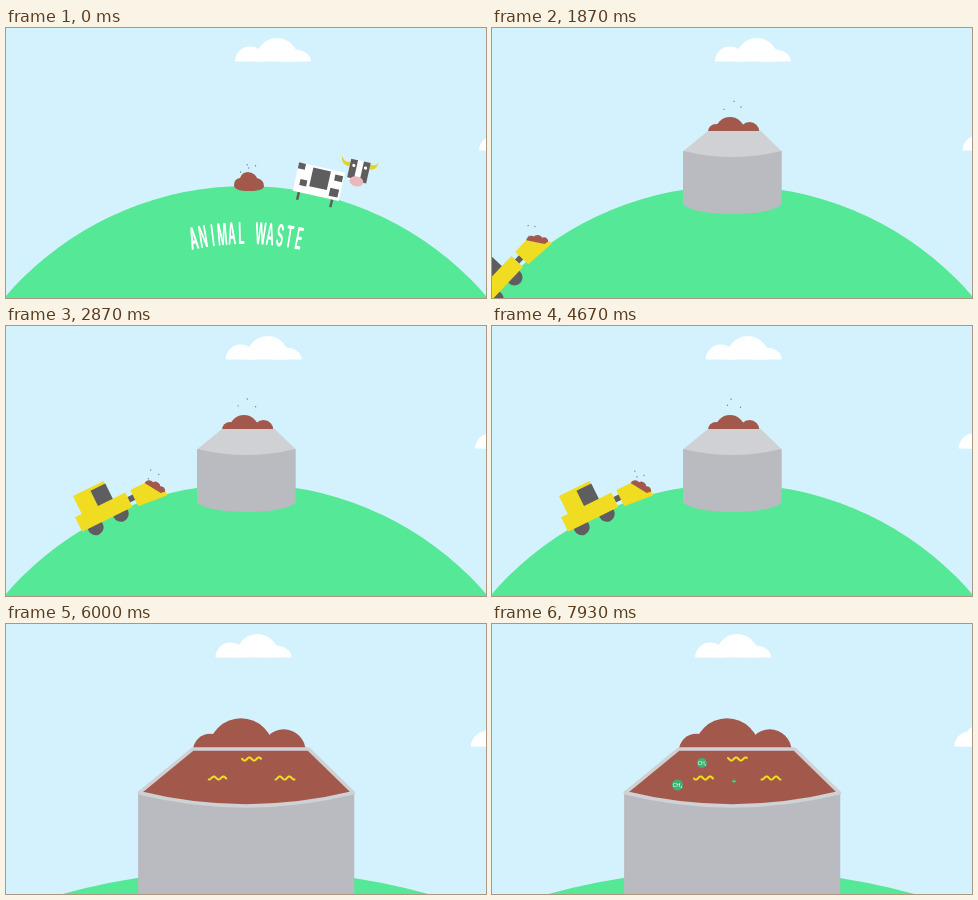
These frames come from a looping animation (480x270 px, 8000 ms). An HTML page with a canvas:

```html
<!DOCTYPE html>
<html lang="en">
<head>
<meta charset="utf-8">
<title>Animal waste</title>
<style>
  html, body { margin: 0; width: 100%; height: 100%; overflow: hidden; background: #d3f2fd; }
  canvas { display: block; width: 480px; height: 270px; }
</style>
</head>
<body>
<canvas id="stage" width="480" height="270"></canvas>
<script>
const ctx = document.getElementById('stage').getContext('2d');
const LOOP = 8000, TAU = Math.PI * 2;
const HILL = { x: 240, y: 475, r: 317 };
const ZOOM = { x: 240.5, y: 84.5, scale: 2.19 };
const SKY = '#d3f2fd', GREEN = '#55e896', STEEL = '#b9bbc1', LIGHT = '#cfd1d4',
      BROWN = '#a2594c', YELLOW = '#f0dc20', DARK = '#5e5e60', BUBBLE = '#3cb371';

const progress = (t, start, end) => Math.min(1, Math.max(0, (t - start) / (end - start)));
const easeInOut = p => p < .5 ? 4 * p ** 3 : 1 - 4 * (1 - p) ** 3;
const easeOut = p => 1 - (1 - p) ** 3;

function rect(color, x, y, w, h) {
  ctx.fillStyle = color;
  ctx.fillRect(x, y, w, h);
}
function ellipse(color, x, y, rx, ry = rx, from = 0, to = TAU) {
  ctx.fillStyle = color;
  ctx.beginPath();
  ctx.ellipse(x, y, rx, ry, 0, from, to);
  ctx.fill();
}
const dome = (color, x, y, rx, ry = rx) => ellipse(color, x, y, rx, ry, Math.PI, TAU);
function path(color, d) {
  ctx.fillStyle = color;
  ctx.fill(new Path2D(d));
}

// Everything on the hill is drawn upright at the top, then turned around its centre.
function onHill(degrees, draw) {
  ctx.save();
  ctx.translate(HILL.x, HILL.y);
  ctx.rotate(degrees * Math.PI / 180);
  ctx.translate(-HILL.x, -HILL.y);
  draw();
  ctx.restore();
}

function cloud(x, y, peak) {
  dome('#fff', x + 15, y, 15);
  dome('#fff', x + peak, y, 22, 23.5);
  dome('#fff', x + peak + 18, y, 16, 12);
}

function flies(t, x, y, spread, count = 3) {
  for (let i = 0; i < count; i++) {
    const dx = (i - (count - 1) / 2) * spread + 2 * Math.sin(t / 170 + i * 2.1);
    const dy = (i % 2 ? -4 : 1) + 2 * Math.cos(t / 140 + i * 1.7);
    ellipse('#72868c', x + dx, y + dy, .7);
  }
}

function wastePile(t) {
  path(BROWN, 'M228 157 Q228 151 234 150 Q236 144 242 144 Q249 145 251 150 Q258 152 258 158 Q258 163 243 163 Q228 163 228 157Z');
  flies(t, 242, 141, 5, 4);
}

function cow() {
  rect(DARK, 222, 158, 2.5, 10);
  rect(DARK, 256, 158, 2.5, 10);
  rect('#fff', 217, 131, 47, 29);
  rect(DARK, 217, 131, 7, 6);
  rect(DARK, 232, 133, 18, 19);
  rect(DARK, 222, 147, 7, 6);
  rect(DARK, 255, 135, 8, 6);
  rect(DARK, 253, 149, 9, 8);
  path('#e3d322', 'M258 115 Q260 122 268 119 V124 Q257 124 258 115Z M294 113 Q294 119 285 117 V123 Q296 122 294 113Z');
  rect('#fff', 267, 116, 20, 21);
  rect(DARK, 267, 116, 7, 19);
  rect(DARK, 280, 116, 7, 21);
  ellipse('#fff', 271, 122, 1.6);
  ellipse('#fff', 283, 122, 1.6);
  ellipse('#e9b7bd', 277, 137, 7, 5);
}

function caption(text) {
  ctx.font = '500 30px Inter, "Open Sans", sans-serif';
  ctx.fillStyle = '#fff';
  ctx.textAlign = 'center';
  [...text].forEach((letter, i) => {
    onHill((i - (text.length - 1) / 2) * 2.05, () => {
      ctx.translate(240, 216);
      ctx.scale(.36, 1);
      ctx.fillText(letter, 0, 0);
      ctx.fillText(letter, 1.5, 0);
    });
  });
}

function tank(t, openness, zoom) {
  dome(BROWN, 224, 104, 8);
  dome(BROWN, 238, 104, 15);
  dome(BROWN, 257.5, 104, 10);
  path(STEEL, 'M191 123 H289.7 V176.5 Q284 182 262 185 Q240 187 219 185 Q197 182 191 176.5Z');
  const cone = 'M191.5 123 L216 103 H268.8 L289.3 123 Q240 135 191.5 123Z';
  path(LIGHT, cone);
  if (openness) {
    ctx.globalAlpha = openness;
    path(BROWN, cone);
    ctx.globalAlpha = 1;
    ctx.strokeStyle = LIGHT;
    ctx.lineWidth = 1.6;
    ctx.stroke(new Path2D(cone));
  }
  if (zoom < 1) {
    ctx.globalAlpha = 1 - zoom;
    flies(t, 241, 79, 7);
    ctx.globalAlpha = 1;
  }
}

function loader(t) {
  ellipse(DARK, 226.5, 163, 8);
  ellipse(DARK, 255, 162, 8);
  rect(DARK, 267, 150, 12, 6);
  rect(YELLOW, 212.5, 145, 56, 16);
  rect(YELLOW, 220, 125, 34, 21);
  rect(DARK, 238, 128, 16.5, 17);
  ellipse(BROWN, 293, 149, 5);
  ellipse(BROWN, 298, 153, 5);
  ellipse(BROWN, 301, 159, 4.5);
  path(YELLOW, 'M274 145 H290 L300 161 L305 162 V166 L274 163Z');
  flies(t, 301, 142, 4);
}

function squiggle(x, y, grow, phase) {
  if (!grow) return;
  ctx.strokeStyle = '#f3dc1e';
  ctx.lineWidth = 2;
  ctx.lineCap = ctx.lineJoin = 'round';
  ctx.beginPath();
  const half = 9.5 * grow;
  for (let dx = -half; dx <= half; dx += .5) {
    ctx.lineTo(x + dx, y + 1.6 * grow * Math.sin(dx * TAU / 9.5 + phase));
  }
  ctx.stroke();
}

function bubble(x, y, radius, grow) {
  if (!grow) return;
  ctx.save();
  ctx.translate(x, y);
  ctx.scale(grow, grow);
  ellipse(BUBBLE, 0, 0, radius);
  ctx.font = `${radius}px Lato, sans-serif`;
  ctx.fillStyle = '#fff';
  ctx.textAlign = 'center';
  ctx.fillText('CH₄', 0, radius * .35);
  ctx.restore();
}

function draw(t) {
  rect(SKY, 0, 0, 480, 270);
  cloud(229 - t * .00326, 33.5, 42);
  cloud(473 - t * .00136, 122.5, 30);

  const turn = 75 * easeInOut(progress(t, 100, 1260));
  const zoom = easeInOut(progress(t, 4680, 5350));
  const scale = 1 + (ZOOM.scale - 1) * zoom;

  ctx.save();
  ctx.translate(ZOOM.x, ZOOM.y);
  ctx.scale(scale, scale);
  ctx.translate(-ZOOM.x, -ZOOM.y);
  ellipse(GREEN, HILL.x, HILL.y, HILL.r);
  if (turn < 75) {
    onHill(turn, () => { wastePile(t); caption('ANIMAL WASTE'); });
    onHill(turn + 12.7, cow);
  }
  if (turn) onHill(turn - 75, () => tank(t, progress(t, 5250, 5600), zoom));
  const away = 1 - easeInOut(progress(t, 1300, 2530)) + easeInOut(progress(t, 4680, 5250));
  if (away < 1) onHill(-26.3 - 34 * away, () => loader(t));
  ctx.restore();

  const phase = t / 160;
  squiggle(245.5, 135, easeOut(progress(t, 5550, 5850)), phase);
  squiggle(279, 154, easeOut(progress(t, 5650, 5950)), phase + 2);
  squiggle(211.5, 154, easeOut(progress(t, 5800, 6150)), phase + 1);

  bubble(185.5, 161, 5.5, easeOut(progress(t, 7450, 7750)));
  bubble(210, 139, 5, easeOut(progress(t, 7680, 8000)));
  bubble(242, 157, 5, easeOut(progress(t, 7890, 8190)));
}

function frame(now) {
  draw(now % LOOP);
  requestAnimationFrame(frame);
}
requestAnimationFrame(frame);
</script>
</body>
</html>
```
